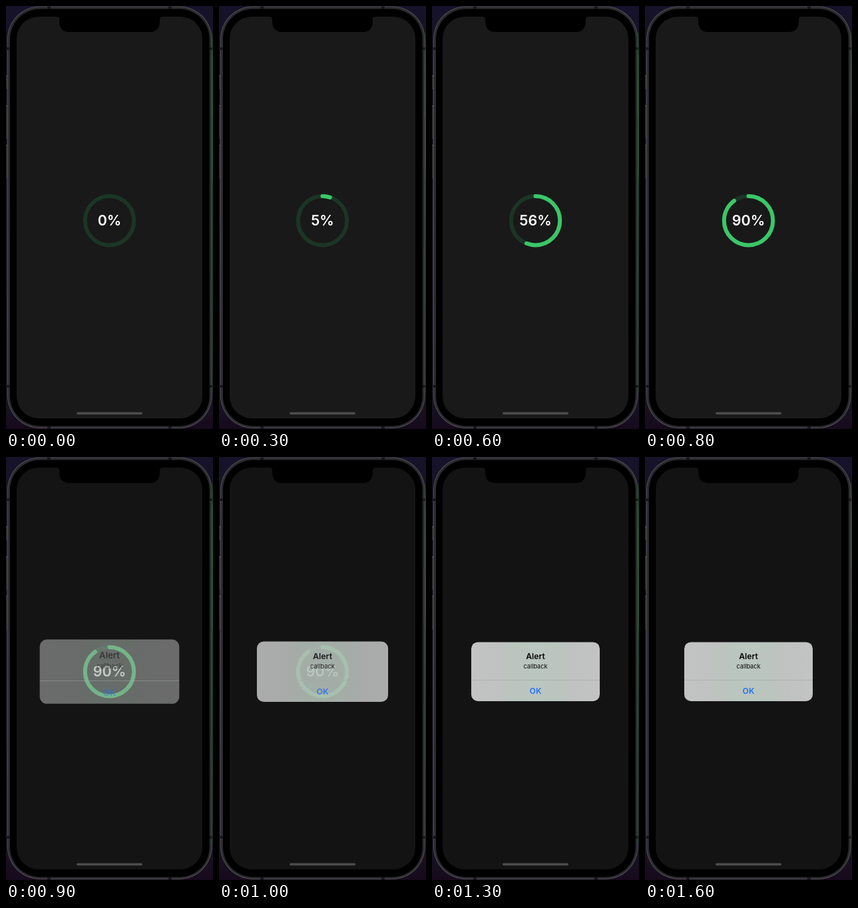
Animation of 311 by 634 pixels, one loop 1700 ms. Source, as an HTML page with a canvas:

```html
<!DOCTYPE html>
<html lang="en">
<head>
<meta charset="utf-8">
<title>Progress alert</title>
<style>
  html, body { margin: 0; width: 100%; height: 100%; overflow: hidden; background: #14121c; }
  canvas { display: block; width: 311px; height: 634px; }
</style>
</head>
<body>
<canvas id="stage"></canvas>
<script>
const W = 311, H = 634, LOOP = 1700, STEP = 100;
const CX = 155.5, CY = 321.7;
const canvas = document.getElementById('stage');
const ctx = canvas.getContext('2d');
const dpr = window.devicePixelRatio || 1;
canvas.width = W * dpr;
canvas.height = H * dpr;

function box(x, y, w, h, r, fill) {
  ctx.beginPath();
  ctx.roundRect(x, y, w, h, r);
  ctx.fillStyle = fill;
  ctx.fill();
}

function label(str, y, size, weight, color, x = 0) {
  ctx.font = `${weight} ${size}px Inter, "Liberation Sans", sans-serif`;
  ctx.textAlign = 'center';
  ctx.textBaseline = 'alphabetic';
  ctx.fillStyle = color;
  ctx.fillText(str, x, y);
}

function ramp(x0, y0, x1, y1, stops) {
  const g = ctx.createLinearGradient(x0, y0, x1, y1);
  for (const [at, color] of stops) g.addColorStop(at, color);
  return g;
}

function drawPhone() {
  // backdrop and the green glow along the right side
  box(0, 0, W, H, 0, ramp(0, 0, 0, H, [[0, '#15122a'], [0.2, '#171722'], [0.5, '#20202e'], [0.9, '#1a1828'], [1, '#160a1c']]));
  box(309, 40, 2, 540, 0, ramp(0, 40, 0, 580, [[0, '#0a2a1c'], [0.08, '#06542c'], [0.35, '#0a6636'], [0.42, '#0a4428'], [1, '#0c2a1e']]));

  // side buttons
  for (const [y, h] of [[104, 21], [149, 50], [208, 51]]) {
    box(0, y, 4, h, 1, '#2f2f32');
    box(0, y, 3, 1, 0, '#55555a');
  }
  box(308, 165, 2, 83, 1, '#26302b');

  // metal rim, bezel and glass
  box(2, 0.5, 307.5, 632.5, 49, '#505053');
  box(3, 1.5, 305.5, 630.5, 48, '#2a2a2d');
  for (const y of [62, 568]) {
    box(2, y, 4, 4, 0, '#18181a');
    box(305.5, y, 4, 4, 0, '#18181a');
  }
  for (const x of [62, 244]) {
    box(x, 0.5, 5, 4, 0, '#18181a');
    box(x, 629, 5, 4, 0, '#18181a');
  }
  box(6, 4.5, 299.7, 625, 45, '#000');
}

function drawNotch() {
  ctx.beginPath();
  ctx.moveTo(76, 15);
  ctx.lineTo(76, 16);
  ctx.quadraticCurveTo(80, 16, 80, 20);
  ctx.lineTo(80, 24);
  ctx.quadraticCurveTo(81, 39, 95, 39);
  ctx.lineTo(216, 39);
  ctx.quadraticCurveTo(230, 39, 231, 24);
  ctx.lineTo(231, 20);
  ctx.quadraticCurveTo(231, 16, 235, 16);
  ctx.lineTo(235, 15);
  ctx.fillStyle = '#000';
  ctx.fill();
}

function ring(part, color) {
  ctx.beginPath();
  ctx.arc(CX, CY, 36.7, -Math.PI / 2, -Math.PI / 2 + part * 2 * Math.PI);
  ctx.lineWidth = 6;
  ctx.lineCap = 'round';
  ctx.strokeStyle = color;
  ctx.stroke();
}

function drawProgress(percent) {
  ring(1, '#1b3526');
  if (percent > 0) ring(percent / 100, '#3bc767');
  label(percent + '%', 329.3, 21.45, 600, '#fff', CX);
}

function drawAlert(scale, alpha) {
  const w = 193, h = 88.6;
  ctx.save();
  ctx.translate(CX, CY);
  ctx.scale(scale, scale);
  ctx.globalAlpha = alpha;
  box(-w / 2, -h / 2, w, h, 10, ramp(-w / 2, 0, w / 2, 0, [
    [0, '#c3c3c4'], [0.2, '#c0c2c1'], [0.38, '#b9c5bd'], [0.5, '#bac6c0'],
    [0.62, '#b9c5bd'], [0.8, '#c0c2c1'], [1, '#c3c3c4']
  ]));
  box(-w / 2, 12.3, w, 0.8, 0, '#a4aca8');
  label('Alert', -18.4, 12.1, 600, '#050505');
  label('callback', -4.3, 9.2, 400, '#0a0a0a');
  label('OK', 33.4, 12.1, 600, '#2272f4');
  ctx.restore();
}

function render(ms) {
  const t = Math.floor(ms / STEP) * STEP;
  ctx.setTransform(dpr, 0, 0, dpr, 0, 0);
  drawPhone();
  box(16, 16, 279, 602, 33, '#191919');

  const percent = t < 300 ? 0 : Math.min(90, 5 + (t - 300) * 0.17);
  drawProgress(Math.round(percent));

  if (t >= 900) {
    // the alert settles exponentially
    const n = (t - 900) / STEP;
    const rest = Math.pow(0.25, n);
    box(16, 16, 279, 602, 33, `rgba(0,0,0,${0.24 - 0.05 * rest})`);
    drawAlert(1 + 0.086 * rest, t >= 1300 ? 1 : 1 - 0.5 * Math.pow(0.27, n));
  }

  drawNotch();
  box(106, 608.8, 99, 3.4, 1.7, '#4c4c4c');
}

let start = null;
function tick(now) {
  if (start === null) start = now;
  render(Math.max(0, now - start) % LOOP);
  requestAnimationFrame(tick);
}
render(0);
requestAnimationFrame(tick);
</script>
</body>
</html>
```
